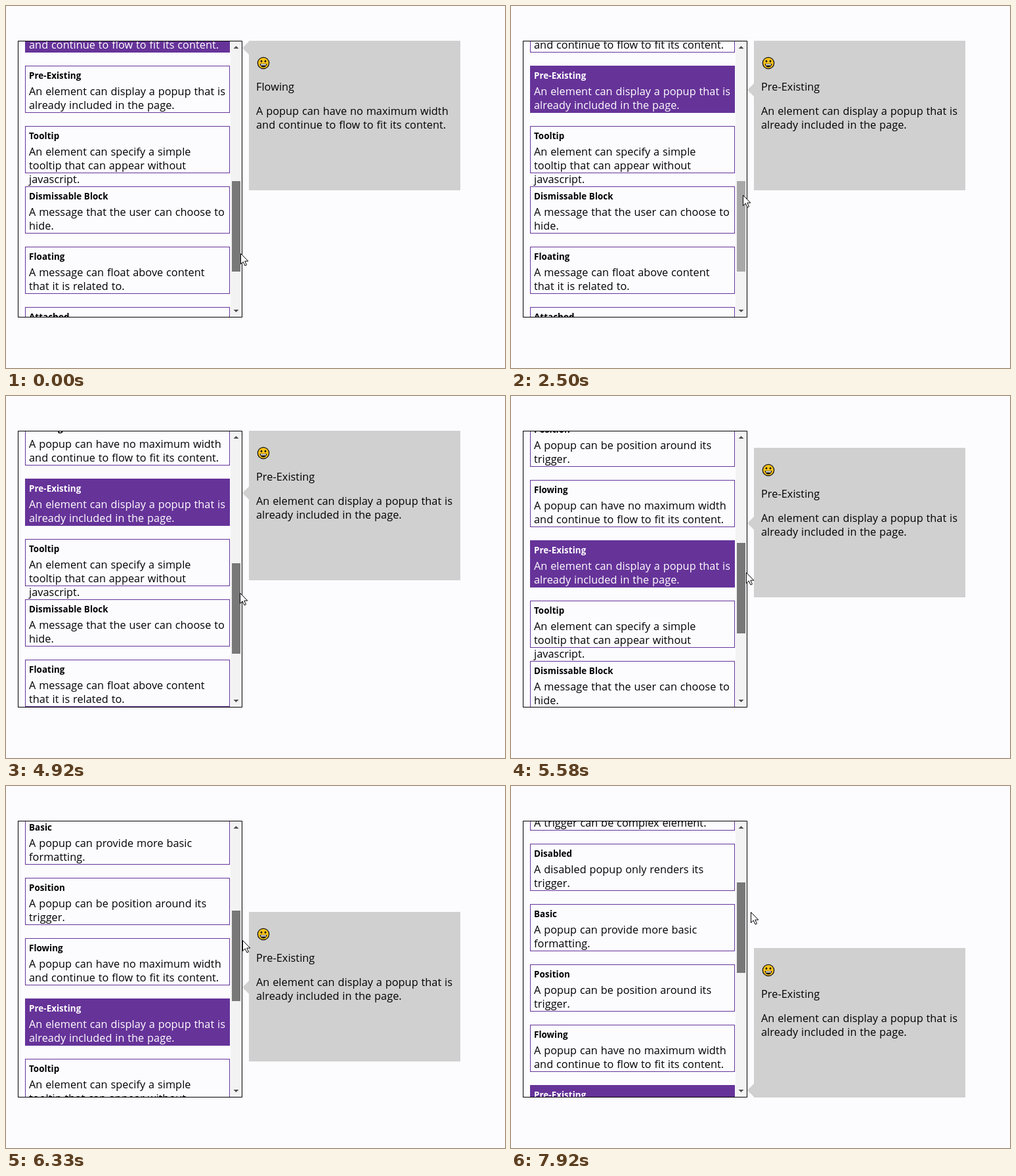
Animation, 760 px wide and 552 px high, one loop 8000 ms. Source, as an HTML page with a canvas:

```html
<!DOCTYPE html>
<html lang="en">
<head>
<meta charset="utf-8">
<title>Popup list</title>
<style>
  html, body { margin: 0; width: 100%; height: 100%; overflow: hidden; background: #fcfcff; }
  canvas { display: block; }
</style>
</head>
<body>
<canvas id="stage" width="760" height="552"></canvas>
<script>
const ctx = document.getElementById('stage').getContext('2d');
const LOOP = 8000, STEP = 1000 / 12;
const PAGE = '#fcfcff', PURPLE = '#663399', GRAY = '#d0d0d0', TRACK = '#f3f3f4';
const FACE = '"Open Sans", "Noto Sans", sans-serif';
const BODY = '16.3px ' + FACE, BOLD = 'bold 13.4px ' + FACE;
const PITCH = 92, CARD_H = 72, FLOWING = 4, EXISTING = 5;
const DRAG_START = 4000, POPUP_LAG = 390;

const cards = [
  ['Complex', '', 'A trigger can be complex element.'],
  ['Disabled', 'A disabled popup only renders its', 'trigger.'],
  ['Basic', 'A popup can provide more basic', 'formatting.'],
  ['Position', 'A popup can be position around its', 'trigger.'],
  ['Flowing', 'A popup can have no maximum width', 'and continue to flow to fit its content.'],
  ['Pre-Existing', 'An element can display a popup that is', 'already included in the page.'],
  ['Tooltip', 'An element can specify a simple', 'tooltip that can appear without', 'javascript.'],
  ['Dismissable Block', 'A message that the user can choose to', 'hide.'],
  ['Floating', 'A message can float above content', 'that it is related to.'],
  ['Attached', 'A message can be attached to content', 'that it is related to.']
];

// Key points: a time, then the values reached at that time.
const scrollPath = [[DRAG_START, 91], [5030, 130], [5580, 220], [6330, 324], [6920, 385], [7920, 456]];
const cursorPath = [[0, 357, 377], [750, 290, 240], [900, 290, 240], [1750, 266, 153],
  [1900, 266, 153], [2500, 353, 288], [2830, 353, 312]];

const clamp = (v, lo, hi) => Math.min(hi, Math.max(lo, v));

function follow(path, t, i = 1) {
  const next = path.findIndex(p => t <= p[0]);
  if (next === 0) return path[0][i];
  if (next < 0) return path[path.length - 1][i];
  const a = path[next - 1], b = path[next];
  return Math.round(a[i] + (b[i] - a[i]) * (t - a[0]) / (b[0] - a[0]));
}

function rect(x, y, w, h, fill) {
  ctx.fillStyle = fill;
  ctx.fillRect(x, y, w, h);
}

function frame(x, y, w, h, color) {
  ctx.strokeStyle = color;
  ctx.lineWidth = 1;
  ctx.strokeRect(x + .5, y + .5, w - 1, h - 1);
}

function poly(points, fill, stroke) {
  ctx.beginPath();
  points.forEach(([x, y]) => ctx.lineTo(x, y));
  ctx.closePath();
  ctx.fillStyle = fill;
  ctx.fill();
  if (stroke) {
    ctx.strokeStyle = stroke;
    ctx.lineWidth = 1;
    ctx.stroke();
  }
}

function oval(x, y, rx, ry, fill) {
  ctx.beginPath();
  ctx.ellipse(x, y, rx, ry, 0, 0, Math.PI * 2);
  ctx.fillStyle = fill;
  ctx.fill();
}

function text(str, x, y, font, color) {
  ctx.font = font;
  ctx.letterSpacing = '0.05px';
  ctx.wordSpacing = font === BODY ? '0.5px' : '0px';
  ctx.fillStyle = color;
  ctx.fillText(str, x, y);
}

function textLines(lines, x, y, color) {
  lines.forEach((line, n) => text(line, x, y + 21 * n, BODY, color));
}

function drawCard([title, ...lines], y, lit) {
  const ink = lit ? '#fff' : '#000';
  if (lit) rect(29, y, 312, CARD_H, PURPLE);
  frame(29, y, 312, CARD_H, PURPLE);
  text(title, 35, y + 20, BOLD, ink);
  textLines(lines, 35, y + 45, ink);
}

function drawList(base, selected, hovered) {
  ctx.save();
  ctx.beginPath();
  ctx.rect(19, 54, 340, 420);
  ctx.clip();
  cards.forEach((card, n) => {
    drawCard(card, base + (n - EXISTING) * PITCH, n === selected || n === hovered);
  });
  ctx.restore();
}

function drawScrollbar(y, color) {
  const arrow = (base, tip) => poly([[346.5, base], [350.5, tip], [354.5, base]], '#505050');
  rect(342, 54, 17, 420, TRACK);
  arrow(65, 61);
  arrow(463, 467);
  rect(344, y, 13, 138, color);
}

function drawSmile(x, y) {
  oval(x, y, 9.3, 9.3, '#111');
  oval(x, y, 8, 8, '#fcc21b');
  for (const side of [-3, 3]) oval(x + side, y - 2.7, 1.3, 1.7, '#111');
  ctx.beginPath();
  ctx.arc(x, y + 1, 5.4, 0, Math.PI);
  ctx.fillStyle = '#111';
  ctx.fill();
  rect(x - 4, y + 1.6, 8, 1.8, '#fff');
}

function drawPopup(top, tip, [title, ...lines]) {
  rect(370, top, 322, 228, GRAY);
  poly([[360, tip], [370, tip - 10], [370, tip + 10]], GRAY);
  drawSmile(392, top + 34);
  text(title, 381, top + 76, BODY, '#000');
  textLines(lines, 381, top + 113, '#000');
}

function drawCursor(x, y) {
  const shape = [[0, 0], [0, 16], [3.7, 12.5], [6.5, 18.5], [9, 17.4], [6.3, 11.6], [11.3, 11.6]];
  poly(shape.map(([dx, dy]) => [x + dx + .5, y + dy + .5]), '#fff', '#000');
}

function hoveredCard(x, y, base) {
  if (x < 29 || x > 340) return -1;
  const n = Math.floor((y - base) / PITCH);
  return y - base - n * PITCH < CARD_H ? n + EXISTING : -1;
}

function draw(now) {
  const t = Math.floor((now % LOOP + 4) / STEP) * STEP;
  const base = follow(scrollPath, t);
  const thumb = Math.round(267 - (base - 91) * .33);
  const pressed = t < 80 || t > 3240;
  const dragging = t >= DRAG_START;
  const x = dragging ? Math.round(353 + (t - DRAG_START) * .003) : follow(cursorPath, t, 1);
  const y = dragging ? thumb + 45 : follow(cursorPath, t, 2);
  const over = x >= 344 && x < 357 && y >= thumb && y < thumb + 138;
  const selected = t < 1910 ? FLOWING : EXISTING;

  // The popup trails the card it belongs to and stays within the list's height.
  const anchor = follow(scrollPath, t - POPUP_LAG) + (selected - EXISTING) * PITCH + 37;

  rect(0, 0, 760, 552, PAGE);
  drawList(base, selected, pressed ? -1 : hoveredCard(x, y, base));
  drawScrollbar(thumb, pressed ? '#787878' : over ? '#a8a8a8' : '#c1c1c1');
  frame(18, 53, 342, 422, '#000');
  drawPopup(clamp(anchor - 115, 53, 247), clamp(anchor, 64, 464), cards[selected]);
  drawCursor(x, y);
}

function tick() {
  draw(performance.now());
  requestAnimationFrame(tick);
}
tick();
</script>
</body>
</html>
```
